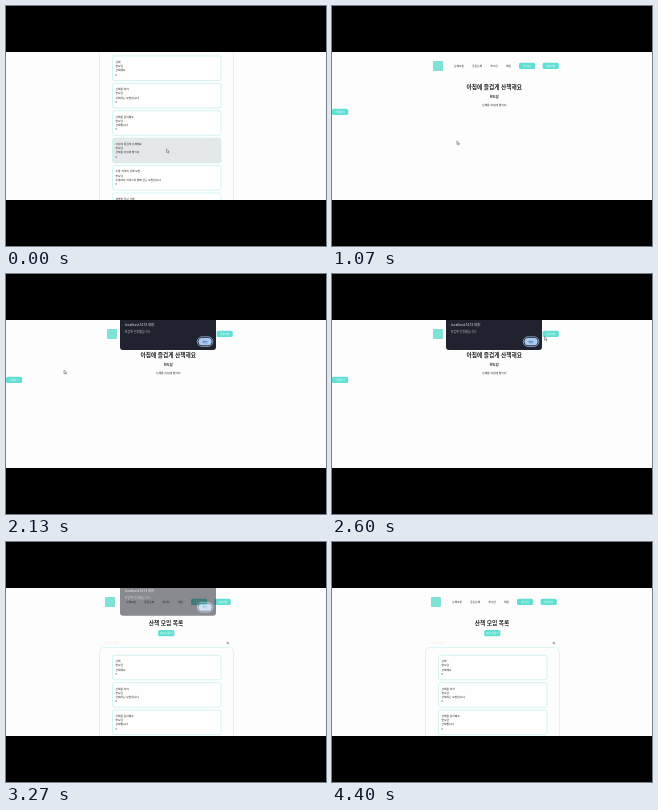
Write an HTML page that moves like this. It is 320 px wide and 240 px high and loops after 4470 ms.

```html
<!DOCTYPE html>
<html lang="ko">
<head>
<meta charset="utf-8">
<style>
html, body { margin: 0; width: 100%; height: 100%; overflow: hidden; background: #000; }
svg { display: block; width: 100%; height: 100%; }
text { font-family: "Noto Sans CJK KR", "Noto Sans CJK", "Noto Sans", sans-serif; white-space: pre; }
</style>
</head>
<body>
<svg viewBox="0 0 320 240">
  <clipPath id="view"><rect y="46" width="320" height="148"/></clipPath>
  <g id="stage" clip-path="url(#view)"></g>
</svg>
<script>
const LOOP = 4470, OPEN = 870, ALERT = 1870, DISMISS = 3200, FADE = 150;
const SCROLL = 63.3, TEAL = '#62dfd3', LINE = '#c3f0ee', INK = '#222';
const AUTHOR = '한도담';
const cards = [
  ['산책', '산책해요'],
  ['산책을 하자', '산책하는 모임입니다'],
  ['산책을 같이해요', '산책합니다'],
  ['아침에 즐겁게 산책해요', '산책을 아침에 합시다'],
  ['주말 저녁의 산책 모임', '주말마다 저녁으로 함께 걷는 모임입니다'],
  ['새벽의 정상 산책', '새벽에 걸어요']
];
// Cursor stops: time, x, y
const stops = [[0, 160.5, 143], [900, 160.5, 143], [1450, 5.5, 107.5],
  [1950, 5.5, 107.5], [2500, 212.5, 62.5], [2700, 212.5, 62.5], [3050, 199, 66], [LOOP, 199, 66]];

function add(parent, tag, attrs, content = '') {
  const el = document.createElementNS('http://www.w3.org/2000/svg', tag);
  for (const key in attrs) el.setAttribute(key, attrs[key]);
  el.textContent = content;
  return parent.appendChild(el);
}
const group = parent => add(parent, 'g', {});
const box = (parent, x, y, width, height, rx, fill, extra) =>
  add(parent, 'rect', { x, y, width, height, rx, fill, ...extra });
const label = (parent, x, y, size, content, extra) =>
  add(parent, 'text', { x, y, 'font-size': size, fill: INK, ...extra }, content);
const centered = (parent, x, y, size, content, extra) =>
  label(parent, x, y, size, content, { 'text-anchor': 'middle', ...extra });

function button(parent, x, y, content) {
  box(parent, x, y, 16.2, 6.3, 1.6, TEAL);
  centered(parent, x + 8.1, y + 4.1, 2.6, content, { fill: '#fff' });
}
function header(parent, x) {
  box(parent, x, 55, 10, 10, 1, '#7fe2d8');
  [[21, '산책모임'], [39, '공동산책'], [57.3, '게시판'], [73, '채팅']]
    .forEach(([dx, name]) => label(parent, x + dx, 61, 2.7, name));
  button(parent, x + 86, 56.7, '로그인');
  button(parent, x + 109.6, 56.7, '회원가입');
}

const stage = document.getElementById('stage');
box(stage, 0, 46, 320, 148, 0, '#fdfdfd');

const list = group(stage);
header(list, 99);
centered(list, 160, 83.3, 5.7, '산책 모임 목록', { 'font-weight': 700 });
button(list, 152.2, 88, '모임 만들기');
label(list, 99, 102, 2.7, '검색어 입력', { fill: '#e6e8dc' });
add(list, 'circle', { cx: 221.7, cy: 100.8, r: .8, fill: 'none', stroke: '#555', 'stroke-width': .5 });
add(list, 'path', { d: 'M222.3 101.4l.8.8', stroke: '#555', 'stroke-width': .5 });
box(list, 93.5, 105.5, 134, 190, 4, 'none', { stroke: LINE, 'stroke-width': .6 });
const cardBoxes = cards.map(([title, about], i) => {
  const y = 113.3 + i * 27.4;
  const card = box(list, 106.5, y, 108.5, 24.5, 2, '#fefefe', { stroke: LINE, 'stroke-width': .7 });
  [title, AUTHOR, about, '0'].forEach((line, row) => label(list, 109.6, y + 6.8 + row * 4.25, 2.7, line));
  return card;
});

const detail = group(stage);
header(detail, 101);
centered(detail, 162.3, 83.3, 5.7, cards[3][0], { 'font-weight': 700 });
centered(detail, 162.3, 92.2, 3.3, AUTHOR, { 'font-weight': 700 });
centered(detail, 162.3, 100.2, 2.8, cards[3][1]);
button(detail, 0, 102.8, '가입하기');

const dialog = group(stage);
box(dialog, 114, 38, 96, 38, 3, '#20232f');
label(dialog, 118.8, 52.2, 3.3, 'localhost:5173 내용:', { fill: '#eee', 'font-weight': 500 });
label(dialog, 118.8, 59, 2.9, '모임에 신청했습니다!', { fill: '#c2c5c4' });
box(dialog, 191.3, 62.8, 15.6, 9.6, 4.8, '#20232f', { stroke: '#a9cbf3', 'stroke-width': .7 });
box(dialog, 192.5, 64, 13.2, 7.2, 3.6, '#a9cbf3');
centered(dialog, 199.1, 68.6, 2.7, '확인', { fill: '#163566' });

const cursor = add(stage, 'path', {
  d: 'M0 0v3.6l.9-.8.7 1.4.7-.3-.7-1.4h1.1z', fill: '#fff', stroke: '#333', 'stroke-width': .4
});

const clamp = v => Math.max(0, Math.min(1, v));
const ease = v => v * v * (3 - 2 * v);
const show = (el, on) => el.setAttribute('display', on ? 'inline' : 'none');

function draw(t) {
  const onDetail = t >= OPEN && t < DISMISS;
  show(list, !onDetail);
  show(detail, onDetail);
  list.setAttribute('transform', `translate(0 ${t < OPEN ? -SCROLL : 0})`);
  cardBoxes[3].setAttribute('fill', t < OPEN ? '#e5e8ea' : '#fefefe');

  const leaving = clamp((t - DISMISS) / FADE);
  show(dialog, t >= ALERT && leaving < 1);
  dialog.setAttribute('opacity', clamp((t - ALERT) / 100) * (1 - leaving));
  dialog.setAttribute('transform', `translate(0 ${-5 * leaving})`);

  const next = Math.max(1, stops.findIndex(s => s[0] > t));
  const [t0, x0, y0] = stops[next - 1], [t1, x1, y1] = stops[next];
  const k = ease(clamp((t - t0) / (t1 - t0)));
  cursor.setAttribute('transform', `translate(${x0 + (x1 - x0) * k} ${y0 + (y1 - y0) * k})`);
  show(cursor, t < DISMISS);
}

const start = performance.now();
function tick() {
  draw((performance.now() - start) % LOOP);
  requestAnimationFrame(tick);
}
tick();
</script>
</body>
</html>
```
